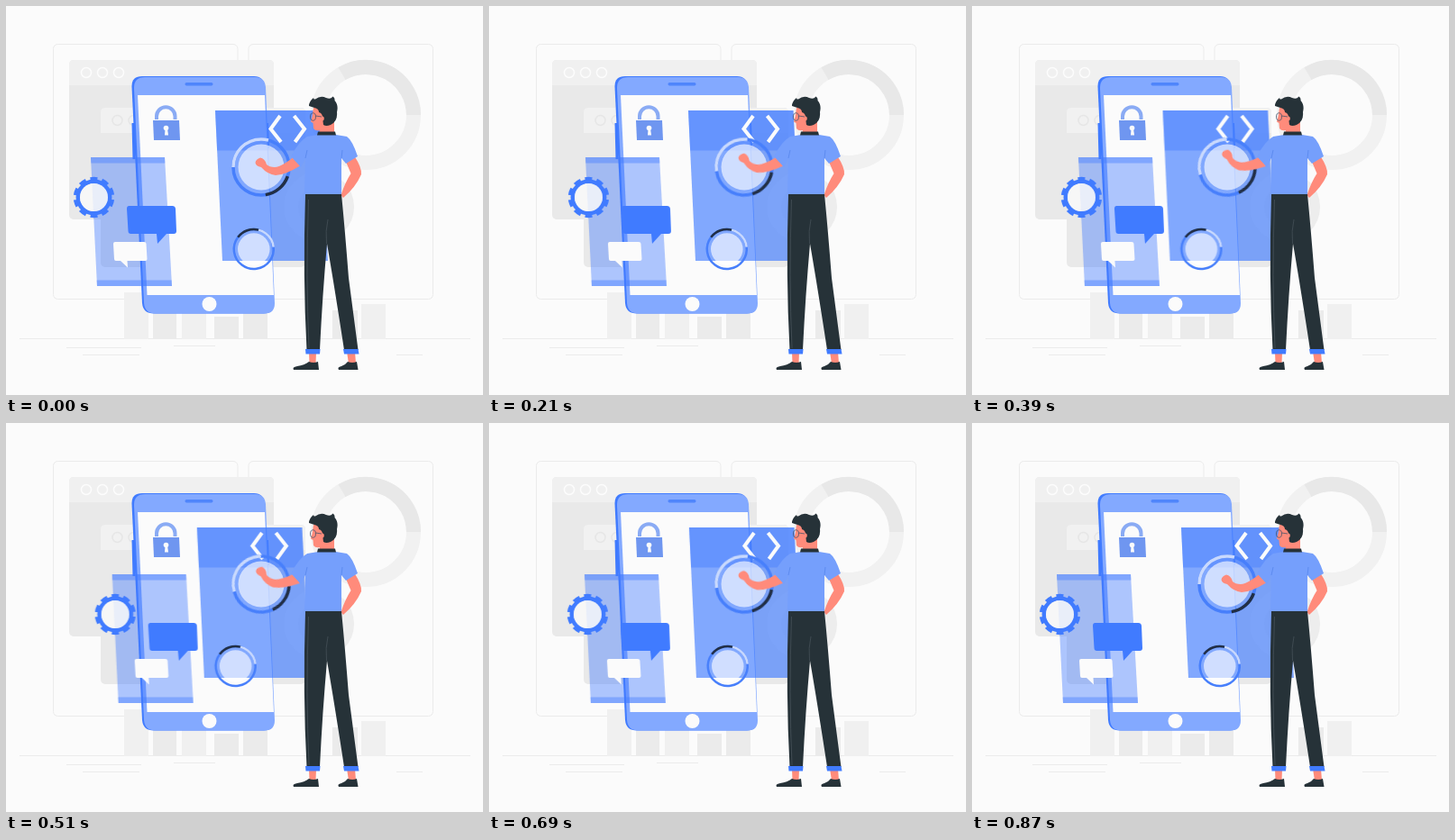
An HTML page for the animation above (900 ms loop, 529 by 432 pixels).

```html
<!DOCTYPE html>
<html lang="en">
<head>
<meta charset="utf-8">
<title>App building</title>
<style>
  html, body { margin: 0; width: 100%; height: 100%; overflow: hidden; background: #fbfbfb; }
  svg { display: block; width: 529px; height: 432px; }

  .blue { fill: #407bff; }
  .dark { fill: #263238; }
  .skin { fill: #ff8b7b; }
  .shirt { fill: #759ffc; }
  .paper { fill: #fbfbfb; }
  .tint { fill: #407bff; fill-opacity: .42; }
  .line { fill: none; stroke: #ebebeb; }
  .ring circle { fill: none; }
  .ring .base { stroke: #477ffb; }
  .ring .pale { stroke: #c9d9fd; }
  .ring .ink { stroke: #222f45; }

  /* out for 15 ticks, back for 14, one tick of rest */
  .move { animation: sway 900ms infinite; }
  .left { --to: translateX(27.6px); }
  .right { --to: translateX(-23.6px); }
  .arm { --to: rotate(15deg); transform-origin: 322px 172px; }
  .dial { --to: rotate(-18deg); transform-origin: 283px 179px; }
  @keyframes sway {
    0% { transform: none; animation-timing-function: steps(15); }
    50% { transform: var(--to); animation-timing-function: steps(14); }
    96.66%, 100% { transform: none; }
  }
</style>
</head>
<body>
<svg viewBox="0 0 529 432">
  <!-- backdrop -->
  <g class="line">
    <rect x="52.5" y="42.5" width="204.500" height="283" rx="5"/>
    <rect x="269" y="42.500" width="204.500" height="283" rx="5"/>
    <path d="M15 369.500H515M67 379.500H150M85 387.500H148M433 387.500H462M186 377.500H232"/>
  </g>
  <g fill="#e9e9e9">
    <rect x="70" y="60" width="227" height="177" rx="5"/>
    <path fill="#f0f0f0" d="M70 88V65Q70 60 75 60H292Q297 60 297 65V88Z"/>
    <rect x="105" y="113" width="227" height="177" rx="5"/>
    <path fill="#f1f1f1" d="M105 141V118Q105 113 110 113H327Q332 113 332 118V141Z"/>
  </g>
  <g fill="none" stroke="#fcfcfc" stroke-width="1.5">
    <circle cx="89" cy="74" r="5.500"/><circle cx="107" cy="74" r="5.500"/><circle cx="125" cy="74" r="5.500"/>
    <circle cx="123.500" cy="127" r="5.500" stroke="#e6e6e6"/><circle cx="141.500" cy="127" r="5.500" stroke="#e6e6e6"/>
  </g>
  <g fill="none" stroke-width="16">
    <circle cx="399" cy="121" r="53" stroke="#f1f1f1"/>
    <circle cx="399" cy="121" r="53" stroke="#e8e8e8" pathLength="360" stroke-dasharray="120 360" transform="rotate(-120 399 121)"/>
    <circle cx="347" cy="223" r="31" stroke="#ededed"/>
  </g>
  <g fill="#f0f0f0">
    <path d="M131 318h27v52h-27zM195 332h27v38h-27zM394 331h27v39h-27z"/>
    <path fill="#ebebeb" d="M163 336h26v34h-26zM231 345h27v25h-27zM263 336h27v34h-27zM362 338h28v32h-28z"/>
  </g>

  <!-- phone -->
  <path class="blue" d="M139.500 130h4v40h-3zM288 130h3l1 28h-3z"/>
  <path class="blue" d="M151 78H275Q286 78 287 90L297 330Q297 341.500 286 341.500H164Q152 341.500 151 330L139.500 90Q139 78 151 78Z"/>
  <path fill="#83a9ff" d="M154 79H276Q287 79 288 90L298 330Q298 341.500 287 341.500H166Q154 341.500 153 330L142 91Q142 79 154 79Z"/>
  <path class="paper" d="M146 99H287L297 321H156.500Z"/>
  <rect x="198.500" y="85" width="31" height="3.500" rx="1.700" fill="#4f85fb"/>
  <circle class="paper" cx="225.500" cy="331" r="8"/>

  <!-- lock -->
  <path d="M167 126V122.500A10 10 0 0 1 187.500 122.500V126" fill="none" stroke="#8aabf4" stroke-width="4"/>
  <path d="M163 127H192L193 149H164Z" fill="#6f96f0"/>
  <circle class="paper" cx="177.500" cy="135.500" r="2.800"/>
  <path class="paper" d="M176.500 136h2.500l1 7.500h-4z"/>

  <!-- left cards -->
  <g class="move left">
    <g class="tint">
      <path d="M94 168H176L184 311H101Z"/>
      <path d="M94 168H176L176.400 174.500H94.300ZM100.600 304.500H183.600L184 311H101Z"/>
    </g>
    <g fill="none" stroke="#407bff">
      <circle cx="97.500" cy="212.500" r="17.700" stroke-width="4.500"/>
      <circle cx="97.500" cy="212.500" r="20.500" stroke-width="4.500" pathLength="100" stroke-dasharray="6 4" transform="rotate(-101 97.500 212.500)"/>
    </g>
    <circle cx="97.500" cy="212.500" r="15.500" fill="#fafafa" fill-opacity=".8"/>
    <path class="blue" d="M136.500 222H184.500Q187.500 222 188 225L189 250Q189 253 186 253H178L168 264L167 253H138.500Q135.500 253 135.500 250L134 225Q134 222 136.500 222Z"/>
    <path class="paper" d="M121 262H153Q155.500 262 155.500 264L156.500 281Q156.500 283 154.500 283H134.500L135 290.500L127 283H122Q120 283 120 281L119 264Q119 262 121 262Z"/>
  </g>

  <!-- right card -->
  <g class="move right">
    <path class="blue" fill-opacity=".65" d="M232 116H348.500L357 283H240Z"/>
    <path class="tint" d="M232 116H348.500L350.700 160.500H234.100Z"/>
    <path d="M304 122L293.500 136.500L305 151M319.500 122L331 136.500L320.500 151" fill="none" stroke="#fbfbfb" stroke-width="4"/>
    <g class="ring" stroke-width="2.500" transform="rotate(217 274.800 270)">
      <circle class="base" cx="274.800" cy="270" r="22"/>
      <circle class="ink" cx="274.800" cy="270" r="22" pathLength="360" stroke-dasharray="67 360"/>
      <circle class="pale" cx="274.800" cy="270" r="22" pathLength="360" stroke-dasharray="70 360" stroke-dashoffset="-67"/>
    </g>
    <circle cx="274.800" cy="270" r="17.800" fill="#fff" fill-opacity=".62"/>
  </g>

  <!-- dial -->
  <g class="move dial">
    <g class="ring" stroke-width="3.500">
      <circle class="base" cx="283" cy="179" r="31"/>
      <circle class="ink" cx="283" cy="179" r="31" pathLength="360" stroke-dasharray="62 360" transform="rotate(19 283 179)"/>
      <circle class="pale" cx="283" cy="179" r="31" pathLength="360" stroke-dasharray="105 360" transform="rotate(180 283 179)"/>
    </g>
  </g>
  <circle cx="283" cy="179" r="25.500" fill="#fff" fill-opacity=".62"/>

  <!-- man -->
  <g class="skin">
    <path class="move arm" d="M320 167C312 173 304 179 298 179Q292 179 289 176Q287 169 282 168.500Q277 170 276.500 174Q277 178 283 179Q290 187 299 188Q309 188 327 177Z"/>
    <path d="M386 166Q395 180 394 187Q388 201 374 213L371.500 210Q376 196 382.500 186L377 173Z"/>
    <path d="M336 384h8l-.5 13h-7zM378 384h9l1 13h-8z"/>
    <path d="M341 113L339.500 123L338 128.500L340.500 130L341 136Q343 139 348 138L347 142H364V125L354 110Z"/>
  </g>
  <path class="dark" d="M336 111Q336 106 341 102Q341 104 343 103.500Q349 99 355 102Q360 104 362.500 100.500Q365 102 364.500 105Q369 110 367 118Q368 128 360 132Q355 134 352 132L351 124Q351 119 347 118Q347 114 342 113Z"/>
  <circle class="skin" cx="350" cy="125" r="2.800"/>
  <g fill="none" stroke="#46536b" stroke-width=".8">
    <ellipse cx="340.500" cy="123" rx="3" ry="4.200"/>
    <path d="M343.500 122L350 123"/>
  </g>
  <path class="shirt" d="M346 143H366L378 145Q384 149 390 167L377 175L372 169V210H331L332 169L327 179L316 167Q325 150 334 145Z"/>
  <path d="M332 169L334 160M372 169L373 160" fill="none" stroke="#5d8bf0"/>
  <path class="dark" d="M346 139.500H365L366 143.500H345Z"/>
  <path class="dark" d="M332 209H372Q376 250 380 302L390.500 382H375Q364 310 356 264Q351 320 348 382H333.500Q329 300 332 209Z"/>
  <path d="M357 237Q354 250 355.500 264M335.500 215Q332.500 300 336 380" fill="none" stroke="#465158" stroke-width=".8"/>
  <path class="blue" d="M332 381H348.500L348 386.500H332.500ZM374 381H390.500L391.500 386.500H375Z"/>
  <path class="dark" d="M336 395Q341 397 346 395L347 404H319Q317 401 323 400Q331 399 336 395ZM379 395Q384 397 389 395L390.500 404H369Q367 401 372 400Q377 398 379 395Z"/>
</svg>
</body>
</html>
```
